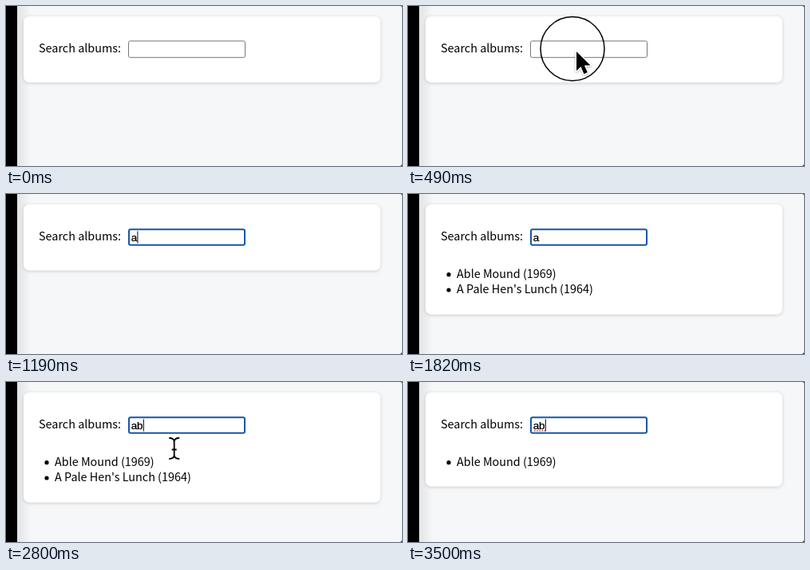
Recreate the animation shown at these times as an HTML page. Size 496x200 px, loop 3570 ms.

```html
<!DOCTYPE html>
<html lang="en">
<head>
<meta charset="utf-8">
<title>Album search</title>
<style>
  html, body { margin: 0; width: 100%; height: 100%; overflow: hidden; background: #f6f7f9; }
  svg { display: block; width: 100%; height: 100%; }
  text { font: 14.4px "Noto Sans CJK JP", "Noto Sans CJK SC", "Noto Sans CJK", sans-serif; white-space: pre; }
  #query { font: 13.33px "Liberation Sans", Arial, sans-serif; stroke: #000; stroke-width: .25; }
  #card { fill: #fff; filter: drop-shadow(0 1.5px 2px rgba(0, 0, 0, .16)); }
  #arrow { stroke: #fff; stroke-width: 3; stroke-linejoin: round; paint-order: stroke;
           filter: drop-shadow(0 1px 1px rgba(0, 0, 0, .3)); }
  #beam path { fill: none; stroke: #000; stroke-width: 1.8; }
  #beam path:first-child { stroke: #fff; stroke-width: 3.4; }
</style>
</head>
<body>
<svg viewBox="0 0 496 200">
  <defs>
    <linearGradient id="edge">
      <stop offset="0" stop-opacity=".08"/>
      <stop offset="1" stop-opacity="0"/>
    </linearGradient>
  </defs>
  <rect width="496" height="200" fill="#f6f7f9"/>
  <rect x="14" width="17" height="200" fill="url(#edge)"/>
  <rect width="14" height="200"/>
  <path d="M496 197Q496 200 493 200H496ZM494 0Q496 0 496 2V0Z"/>

  <rect id="card" x="22" y="13" width="447" rx="7"/>
  <text x="41" y="58">Search albums:</text>
  <rect id="field" fill="#fff"/>
  <text id="query" x="156.7" y="58.5"></text>
  <path id="spelling" d="M158 61H172" stroke="#d8413a" stroke-width="1.6" stroke-dasharray="1.6 1.6"/>
  <rect id="caret" y="46.5" width="1" height="15"/>

  <g id="first">
    <circle cx="51" cy="100.7" r="2.6"/>
    <text x="61" y="105">Able Mound (1969)</text>
  </g>
  <g id="second">
    <circle cx="51" cy="120" r="2.6"/>
    <text x="61" y="124">A Pale Hen's Lunch (1964)</text>
  </g>

  <circle id="ring" cx="206" cy="53.5" fill="none" stroke="#000" stroke-width="1.5"/>
  <path id="arrow" d="M0 0V24L5.5 18.8L9.4 28L13.8 26L9.9 17.3H17.5Z"/>
  <g id="beam"></g>
</svg>
<script>
const LOOP = 3570, STEP = 70;
const $ = id => document.getElementById(id);
const show = (id, on) => $(id).setAttribute('visibility', on ? 'visible' : 'hidden');
const set = (id, attrs) => {
  for (const name in attrs) $(id).setAttribute(name, attrs[name]);
};
const within = (t, from, to) => t >= from && t < to;
const progress = (t, from, to) => Math.min(1, Math.max(0, (t - from) / (to - from)));
const mix = (a, b, p) => a + (b - a) * p;

const beamShape = 'M-6.5-13Q0-13 0-8Q0-13 6.5-13M0-8V8M-6.5 13Q0 13 0 8Q0 13 6.5 13M-3 1.5H3';
$('beam').innerHTML = `<path d="${beamShape}"/>`.repeat(2);

function drawField(t) {
  const focused = t >= 910;
  const border = focused ? 2 : 1;
  set('field', {
    x: 153 + border / 2, y: 43.3 + border / 2, width: 147 - border, height: 21.5 - border,
    rx: 2,
    stroke: focused ? '#1557a8' : t >= 630 ? '#444' : '#767676',
    'stroke-width': border
  });
  const query = t < 1190 ? '' : t < 2450 ? 'a' : 'ab';
  $('query').textContent = query;
  set('caret', { x: 157 + 7.4 * query.length });
  show('caret', within(t, 910, 1820) || within(t, 2240, 3080) || t >= 3500);
  show('spelling', t >= 3500);
}

function drawResults(t) {
  show('first', t >= 1820);
  show('second', within(t, 1820, 3080));
  set('card', { height: t < 1820 ? 82.5 : t < 3080 ? 137.5 : 117.5 });
}

function drawPointer(t) {
  let x = 211, y = 57, arrow = within(t, 70, 630), beam = within(t, 630, 1190);
  if (t < 630) {
    const p = 1 - (1 - progress(t, 70, 420)) ** 2;
    x = mix(237, 211, p);
    y = mix(138, 57, p);
  } else if (t < 1190) {
    y = 60;
  } else {
    const p = progress(t, 2800, 3080), eased = p * p * (3 - 2 * p);
    x = mix(210.7, 249.5, eased);
    y = mix(83, 196, eased);
    beam = t >= 2800 && y < 110;
    arrow = y >= 110 && t < 3290;
  }
  show('arrow', arrow);
  show('beam', beam);
  for (const id of ['arrow', 'beam']) set(id, { transform: `translate(${x} ${y})` });

  // The click ring grows steadily, then vanishes.
  const growing = within(t, 350, 630);
  set('ring', { r: growing ? 40 + 18 * (t - 490) / STEP : 31.5 });
  show('ring', growing || within(t, 910, 980));
}

const start = performance.now();
function frame() {
  const elapsed = (performance.now() - start) % LOOP;
  const t = Math.floor(elapsed / STEP) * STEP;
  drawField(t);
  drawResults(t);
  drawPointer(t);
  requestAnimationFrame(frame);
}
frame();
</script>
</body>
</html>
```
